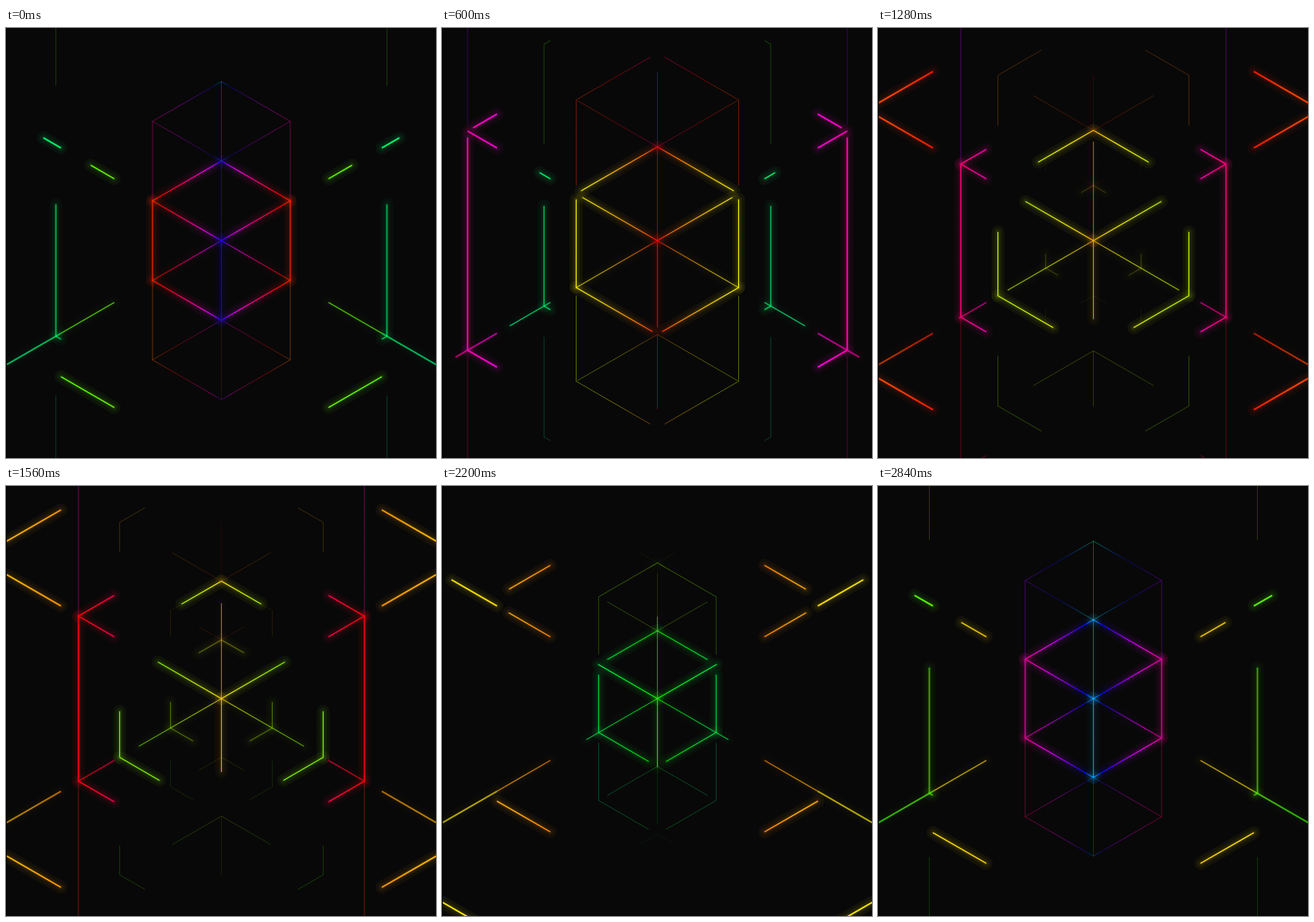
An HTML page with a canvas that plays this animation: 540x540 px, repeating every 2880 ms.

```html
<!DOCTYPE html>
<html lang="en">
<head>
<meta charset="utf-8">
<title>Neon cubes</title>
<style>
html, body { margin: 0; width: 100%; height: 100%; overflow: hidden; background: #080808; }
canvas { display: block; width: 540px; height: 540px; }
</style>
</head>
<body>
<canvas id="stage" width="540" height="540"></canvas>
<script>
const ctx = document.getElementById('stage').getContext('2d');
const LOOP = 2880, STEP = 40, CX = 270.5, CY = 267, BASE = 86.5;

// Mirrored strips: the same zoom, enlarged and shifted in time.
const BANDS = [
  { zoom: 1, shift: 0, lo: 0, hi: 134.5, width: 1.15 },
  { zoom: 2, shift: 1 / 2, lo: 134.5, hi: 201.5, width: 1.5 },
  { zoom: 3, shift: 2 / 3, lo: 201.5, hi: 269.5, width: 1.9 }
];

// Hue over one zoom, as [phase, degrees], at the axis and at the rim.
const INNER = [[0, 225], [.21, 348], [.32, 358], [.44, 398], [.65, 426], [.764, 484], [1, 585]];
const OUTER = [[0, 348], [.11, 374], [.21, 405], [.32, 416], [.5, 436], [.65, 486],
  [.764, 512], [.82, 590], [.875, 673], [1, 708]];
const DRIFT = 44;            // hue lost over one loop, regained at the restart
const ABOVE = -45, BELOW = 15; // hue of the faint cubes against the main one

const clamp = (v, a = 0, b = 1) => Math.min(b, Math.max(a, v));
const mix = (a, b, t) => a + (b - a) * t;
const ramp = (x, from, to) => clamp((x - from) / (to - from));
const ease = (x, start, span) => (1 - Math.cos(Math.PI * ramp(x, start, start + span))) / 2;

function lookup(keys, x) {
  const i = Math.max(1, keys.findIndex(k => k[0] >= x));
  const [x0, y0] = keys[i - 1], [x1, y1] = keys[i];
  return mix(y0, y1, ramp(x, x0, x1));
}

function line(x0, y0, x1, y1, style, width, alpha) {
  ctx.globalAlpha = alpha;
  ctx.strokeStyle = style;
  ctx.lineWidth = width;
  ctx.beginPath();
  ctx.moveTo(x0, y0);
  ctx.lineTo(x1, y1);
  ctx.stroke();
}

function drawBand(band, time) {
  const x = (time / LOOP + band.shift) % 1;
  const bump = .115 * Math.pow(x, .8) * (1 - x) * (1 - x);
  const full = BASE * band.zoom * Math.pow(2, x) * Math.exp(bump);
  const drift = DRIFT * (.5 - time / LOOP);
  const inner = lookup(INNER, x) + drift, outer = lookup(OUTER, x) + drift;

  const color = (dx, tint) => {
    const out = Math.pow(clamp(dx / (BASE * band.zoom)), .55);
    return `hsl(${mix(inner, outer, out) + tint}, 100%, 50%)`;
  };

  // Draws the first part of an edge, cut to the strip, on both sides.
  function edge(r, u0, v0, u1, v1, len, alpha, glow = 0, tint = 0) {
    if (len < .01 || alpha < .01) return;
    const s = r / Math.cos(Math.PI / 6);
    const ax = u0 * r, ay = v0 * s, bx = u1 * r, by = v1 * s;
    let a = 0, b = len;
    if (ax === bx) {
      if (ax < band.lo || ax >= band.hi) return;
    } else {
      const p = (band.lo - ax) / (bx - ax), q = (band.hi - ax) / (bx - ax);
      a = Math.max(a, Math.min(p, q));
      b = Math.min(b, Math.max(p, q));
      if (a >= b) return;
    }
    const px = mix(ax, bx, a), py = mix(ay, by, a);
    const qx = mix(ax, bx, b), qy = mix(ay, by, b);
    const sides = ax === 0 && bx === 0 ? [1] : [-1, 1];
    for (const side of sides) {
      const x0 = CX + side * px, y0 = CY + py, x1 = CX + side * qx, y1 = CY + qy;
      const paint = ctx.createLinearGradient(x0, y0, x1, y1);
      for (let i = 0; i <= 8; i++) paint.addColorStop(i / 8, color(mix(px, qx, i / 8), tint));
      if (glow) {
        ctx.lineCap = 'round';
        line(x0, y0, x1, y1, paint, 16, .05 * alpha * glow);
        line(x0, y0, x1, y1, paint, 9, .05 * alpha * glow);
        line(x0, y0, x1, y1, paint, 4.5, .07 * alpha * glow);
      }
      ctx.lineCap = 'butt';
      line(x0, y0, x1, y1, paint, glow ? band.width : Math.min(1, band.width), alpha);
    }
  }

  function rim(r, len, alpha) {
    edge(r, 0, -1, 1, -.5, len, alpha, 1);
    edge(r, 1, .5, 1, -.5, len, alpha, 1);
    edge(r, 1, .5, 0, 1, len, alpha, 1);
  }

  const half = full / 2;
  const grow = ease(x, .18, .78);

  // Faint cubes above and below: the large pair leaves, the small pair arrives.
  const fade = .4 * (1 - ramp(x, .25, .85));
  const away = 1 - ease(x, .075, .7);
  const spoke = 1 - ramp(x, .2, .86);
  const stem = 1 - ease(x, 0, .475) / 2;
  const faint = .38 * ramp(x, .35, .95);
  for (const m of [-1, 1]) {
    const tint = m < 0 ? ABOVE : BELOW;
    edge(full, 1, 1.5 * m, 0, 2 * m, away, fade, 0, tint);
    edge(full, 1, 1.5 * m, 1, .5 * m, away, fade, 0, tint);
    edge(full, 0, m, 1, 1.5 * m, spoke, fade * .85, 0, tint);
    edge(full, 0, m, 0, 2 * m, stem, .34 * (1 - ramp(x, .3, .62)), 0, tint);

    const top = m < 0;
    edge(half, 1, 1.5 * m, 0, 2 * m, top ? 1 : grow, top ? .38 * ramp(x, .48, .8) : faint, 0, tint);
    edge(half, 1, 1.5 * m, 1, .5 * m, grow, faint, 0, tint);
    edge(half, 0, m, 1, 1.5 * m, grow, faint, 0, tint);
    edge(half, 0, m, 0, 2 * m, grow, .34 * ramp(x, .65, .95), 0, tint);
  }

  // Main cube: spokes shrink to half while the rim is replaced.
  const dimSpoke = 1 - ease(x, .205, .8) / 2;
  const brightSpoke = 1 - ease(x, 0, .81) / 2;
  edge(full, 0, 0, 1, .5, dimSpoke, .68, .35);
  edge(full, 0, 0, 0, -1, dimSpoke, .55, .2);
  rim(full, 1 - ease(x, .08, .81), 1 - .9 * ramp(x, .55, .75));
  rim(half, grow, ramp(x, .35, .87));
  edge(full, 0, 0, 1, -.5, brightSpoke, .95, 1);
  edge(full, 0, 0, 0, 1, brightSpoke, .8, .7);
}

function frame(now) {
  const elapsed = Math.max(0, now - start);
  const time = Math.floor(elapsed / STEP) * STEP % LOOP;
  ctx.globalAlpha = 1;
  ctx.fillStyle = '#080808';
  ctx.fillRect(0, 0, 540, 540);
  for (const band of BANDS) drawBand(band, time);
  ctx.globalAlpha = 1;
  ctx.fillStyle = '#000';
  ctx.fillRect(0, 0, 1, 540);
  requestAnimationFrame(frame);
}

const start = performance.now();
frame(start);
</script>
</body>
</html>
```
